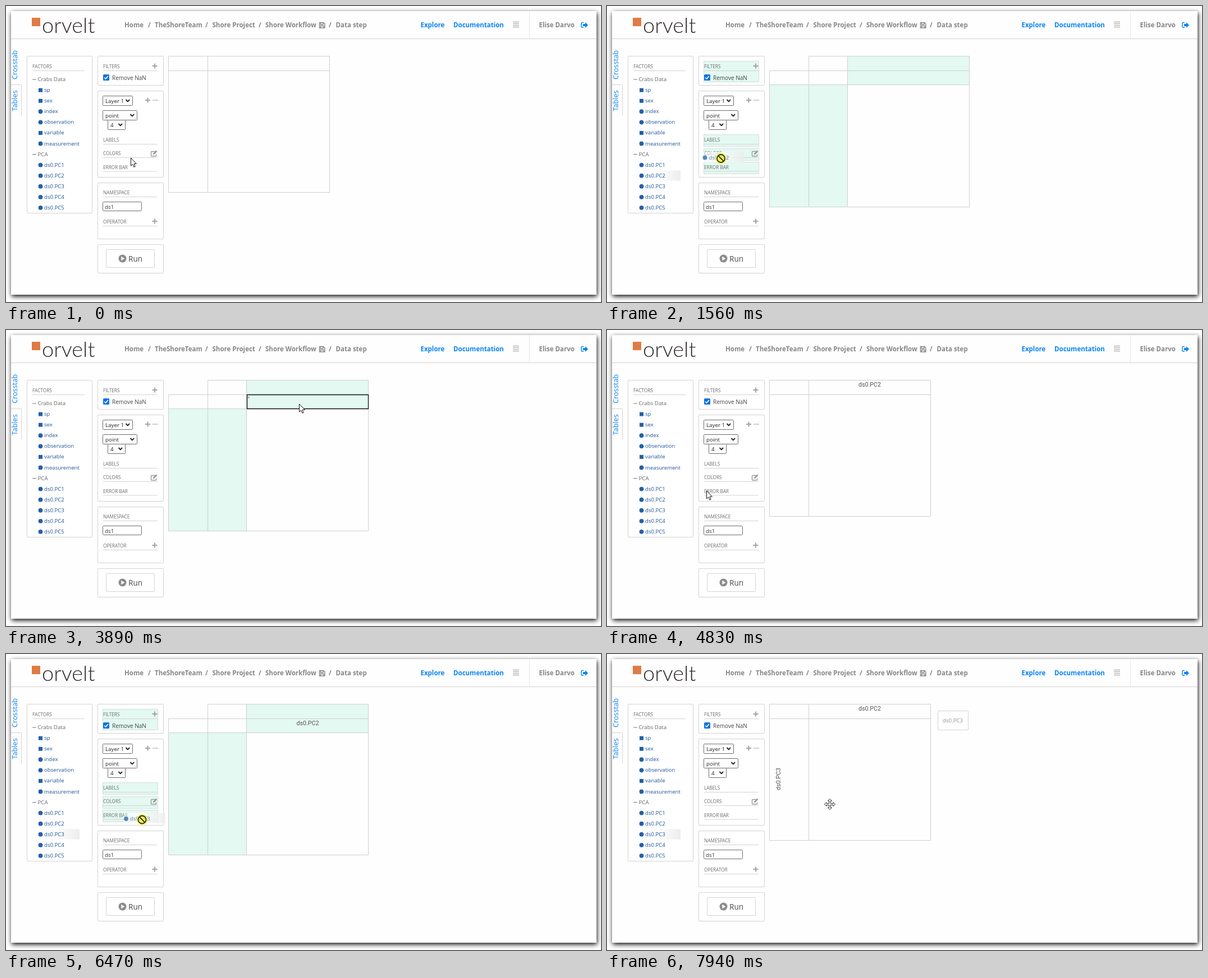
An HTML page for the animation above (8000 ms loop, 1060 px wide and 528 px high).

```html
<!DOCTYPE html>
<html lang="en">
<head>
<meta charset="utf-8">
<title>Data step</title>
<style>
html, body { margin: 0; width: 100%; height: 100%; overflow: hidden; background: #fff; }
svg { display: block; width: 1060px; height: 528px; }
text { font-family: "Open Sans", "Noto Sans", sans-serif; white-space: pre; }
.axis { font-family: Roboto, "Liberation Sans", sans-serif; }
.logo { font-family: Lato, "Open Sans", sans-serif; }
#win { filter: drop-shadow(1px 3px 4.2px rgba(0, 0, 0, .95)); }
</style>
</head>
<body>
<svg id="stage" viewBox="0 0 1060 528" xmlns="http://www.w3.org/2000/svg">
  <defs>
    <linearGradient id="shade">
      <stop offset=".3" stop-color="#f2f2f2" stop-opacity="0"/>
      <stop offset="1" stop-color="#ededed"/>
    </linearGradient>
    <linearGradient id="veil">
      <stop offset="0" stop-color="#fff" stop-opacity=".55"/>
      <stop offset=".3" stop-color="#fff"/>
      <stop offset="1" stop-color="#ececec"/>
    </linearGradient>
  </defs>
  <rect id="win" x="9" y="9" width="1043" height="506" fill="#fefefe"/>
  <g id="base"></g>
  <g id="marks"></g>
  <g id="panels"></g>
  <g id="grid"></g>
  <g id="pointer"></g>
</svg>
<script>
const LOOP = 8000;
const GREY = '#868686', LINE = '#d3d3d3', BLUE = '#0a84f5', ITEM = '#2460a8', LINK = '#1f5596', MINT = '#e3f9f1';
const $ = id => document.getElementById(id);

const text = (x, y, s, size = 9.7, fill = '#666', extra = '') =>
  `<text x="${x}" y="${y}" font-size="${size}" fill="${fill}" ${extra}>${s}</text>`;
const bold = (x, s, fill = GREY) => text(x, 38, s, 11.5, fill, 'font-weight="700"');
const path = (d, stroke = LINE, extra = '') => `<path d="${d}" fill="none" stroke="${stroke}" ${extra}/>`;
const fill = (x0, y0, x1, y1, color, extra = '') =>
  `<rect x="${x0}" y="${y0}" width="${x1 - x0}" height="${y1 - y0}" fill="${color}" ${extra}/>`;
const box = (x0, y0, x1, y1, stroke = LINE, r = 1.5) =>
  fill(x0 + .5, y0 + .5, x1 + .5, y1 + .5, '#fff', `stroke="${stroke}" rx="${r}"`);
const label = (x, y, s, end) =>
  text(x, y, s, 8.25, '#6c6c6c') + path(`M${x} ${y + 4.5}H${end}`);
const plus = (x, y) => path(`M${x - 4.5} ${y}h9M${x} ${y - 4.5}v9`, '#a3a3a3', 'stroke-width="2"');
const select = (x0, y0, x1, s) => box(x0, y0, x1, y0 + 17, '#6d6d6d', 1) +
  text(x0 + 5, y0 + 12.7, s, 9.8, '#222') +
  path(`M${x1 - 11.5} ${y0 + 7}l3.3 3.4l3.3 -3.4`, '#222', 'stroke-width="1.8"');

// Factor list
const GROUPS = { '-1': 'Crabs Data', 6: 'PCA' };
const NAMES = ['sp', 'sex', 'index', 'observation', 'variable', 'measurement', '',
  'ds0.PC1', 'ds0.PC2', 'ds0.PC3', 'ds0.PC4', 'ds0.PC5'];
const rowY = i => 149.6 + 19.07 * i;
const bullet = (x, y, square) => square
  ? fill(x - 3.5, y - 3, x + 3.5, y + 4, ITEM)
  : `<circle cx="${x}" cy="${y + .5}" r="3.9" fill="${ITEM}"/>`;
const factor = (i, square) => bullet(61.5, rowY(i), square) + text(68, rowY(i) + 3.6, NAMES[i], 9.6, LINK);

function factors() {
  let out = '';
  for (const i in GROUPS) {
    out += path(`M47 ${rowY(+i) + .5}h7`, '#777') + text(56.5, rowY(+i) + 3.6, GROUPS[i], 9.7, '#666');
  }
  NAMES.forEach((s, i) => {
    if (s) out += factor(i, [0, 1, 4].includes(i));
  });
  return out;
}

function header() {
  return fill(46, 21, 61, 36, '#df7b45') +
    text(64, 48, 'orvelt', 38, '#2e2826', 'class="logo" font-weight="300"') +
    bold(211, 'Home') + bold(253, '/') + bold(265, 'TheShoreTeam') + bold(355, '/') +
    bold(367.5, 'Shore Project') + bold(450, '/') + bold(462, 'Shore Workflow') +
    path('M558.5 29.5h7l2.5 2.5v7h-9.5zM560.5 30v3h4.5v-3M560.5 39v-3.5h5.5v3.5', GREY, 'stroke-width="1.4"') +
    bold(575, '/') + bold(587.5, 'Data step') +
    bold(738.5, 'Explore', BLUE) + bold(797, 'Documentation', BLUE) +
    path('M903 28.5h11M903 31.5h11M903 34.5h11M903 37.5h11', '#999') +
    bold(949.5, 'Elise Darvo') +
    path('M1029 29.5h-2.5q-1.5 0 -1.5 1.5v5.5q0 1.5 1.5 1.5h2.5', BLUE, 'stroke-width="1.5"') +
    `<path d="M1028 32h4v-3l5 5l-5 5v-3h-4z" fill="${BLUE}"/>` +
    path('M9 58.5H1052') + path('M932.5 9V58', '#e6e6e6');
}

function sidebar() {
  const tab = (y, s) => text(0, 0, s, 12.7, BLUE, `transform="translate(20 ${y}) rotate(-90)"`);
  return tab(131, 'Crosstab') + tab(187.5, 'Tables') + path('M9 140.5H27.5V195.5') +
    box(37, 89, 153, 369) + label(47, 111, 'FACTORS', 140) +
    box(163, 89, 280, 141) + box(163, 151, 280, 305) + box(163, 315, 280, 415) + box(163, 425, 280, 476);
}

function controls() {
  const pencil = path('M266 259.5h-6.5q-1 0 -1 1v6.5q0 1 1 1h7q1 0 1 -1v-2.5', '#999', 'stroke-width="1.4"') +
    path('M262.5 264.5l6 -6', '#999', 'stroke-width="2.6"');
  return label(173, 111, 'FILTERS', 270) + plus(265, 107) +
    fill(173, 122, 184, 133, '#0f74e0', 'rx="1.5"') +
    path('M175.3 127.7l2.3 2.4l4.2 -5', '#fff', 'stroke-width="1.6"') + text(189, 131.8, 'Remove NaN', 10, '#444') +
    select(172, 160, 225, 'Layer 1') + select(172, 186, 233, 'point') + select(181, 203, 212, '4') +
    plus(252.5, 168) + path('M261 168h10', '#cfcfcf', 'stroke-width="2"') +
    label(173, 242, 'LABELS', 270) + label(173, 266, 'COLORS', 270) + pencil +
    label(173, 290.5, 'ERROR BAR', 270) + label(173, 336, 'NAMESPACE', 270) +
    box(172, 349, 241, 365, '#6d6d6d', 2) + text(176, 361.5, 'ds1', 9.8, '#333') +
    label(173, 388, 'OPERATOR', 270) + plus(265, 384) +
    box(178, 434, 264, 466) + '<circle cx="207.5" cy="450.5" r="7" fill="#8c8c8c"/>' +
    '<path d="M205.3 446.8l6 3.7l-6 3.7z" fill="#fff"/>' + text(218, 456, 'Run', 13.6, '#4a4a4a');
}

const mintBox = (y0, y1) => fill(172.5, y0 + .5, 270.5, y1 + .5, MINT, 'stroke="#d2deda"');
const HIGHLIGHT = mintBox(98, 135) + mintBox(229, 250) + mintBox(254, 275) + mintBox(278, 299);

// Crosstab
const axisName = (x, y, s) => text(x, y, s, 10.7, '#555', 'class="axis" text-anchor="middle"');
const ZONES = [[429, 115, 646, 141], [429, 89, 646, 115], [290, 141, 359, 358], [359, 141, 429, 358]];
const inside = (p, [x0, y0, x1, y1]) => p.x >= x0 && p.x < x1 && p.y >= y0 && p.y < y1;

function crosstab(t, p, wide, dragging) {
  const named = t >= 4050;
  if (!wide) {
    let out = path('M289.5 89.5H576.5V332.5H289.5zM359.5 89.5V332.5M289.5 115.5H576.5', '#cfcfcf');
    if (named) out += axisName(468, 101, 'ds0.PC2');
    if (t >= 7940) {
      out += `<g transform="translate(309 223) rotate(-90)">${axisName(0, 0, 'ds0.PC3')}</g>` +
        box(589, 101, 643, 135) + text(598, 122.3, 'ds0.PC3', 9.7, '#8f8f8f');
    }
    return out;
  }
  let out = fill(429, 89, 646, 141, MINT) + fill(290, 141, 429, 358, MINT) +
    path('M359.5 89.5H645.5V358.5H289.5V115.5H645.5M359.5 89.5V358.5M428.5 89.5V358.5M289.5 140.5H645.5', '#cfcfcf');
  if (named) out += axisName(537.5, 127, 'ds0.PC2');
  const zone = ZONES.find(z => inside(p, z));
  if (zone) {
    const [x0, y0, x1, y1] = zone;
    out += path(`M${x0 + .5} ${y0 + .5}H${x1 - .5}V${y1 - .5}H${x0 + .5}z`, '#111', 'stroke-width="1.3"');
    if (!dragging && !named) out += path('M430.5 118.5l3.5 3.5m0 -3.5l-3.5 3.5', '#666', 'stroke-width=".8"');
  }
  return out;
}

// Cursor route: time, x, y, number of equal jumps since the previous key, eased
const ROUTE = [
  [0, 222, 271, 1], [780, 89, 303, 10, 1], [1470, 106, 300, 1], [1555, 203, 272, 1],
  [2180, 510, 150, 8], [2340, 520, 139, 2], [2640, 524, 135, 4], [2800, 522, 132, 1],
  [4050, 522, 129, 1], [4130, 522, 129, 1], [4990, 100, 322, 11, 1], [5220, 97, 327, 3],
  [5530, 89, 320, 4], [6070, 95, 322, 1], [6840, 390, 269, 10, 1], [7080, 397, 268, 3]
];

function cursorAt(t) {
  const i = ROUTE.findIndex(k => k[0] > t);
  if (i < 0) return { x: 397, y: 268 };
  const [t0, x0, y0] = ROUTE[i - 1], [t1, x1, y1, n, eased] = ROUTE[i];
  let u = Math.floor((t - t0) / (t1 - t0) * n + .001) / n;
  if (eased) u = u * u * (3 - 2 * u);
  else if (n > 4) u = 1 - Math.pow(1 - u, 1.5);
  return { x: x0 + (x1 - x0) * u, y: y0 + (y1 - y0) * u };
}

const ARROW = '<path d="M.5 0V14.2L3.7 11.2L5.8 16.3L8.1 15.3L6 10.4H10.3Z" fill="#fff" stroke="#111"/>';
const DROP = ARROW + '<rect x="3" y="14.5" width="9" height="6.5" rx="1" fill="#fff" stroke="#222" stroke-width="1.3" stroke-dasharray="2 .6"/>';
const DENY = path('M-5 -5L5 5', '#33330c', 'stroke-width="1.8"') +
  '<circle r="7" fill="none" stroke="#33330c" stroke-width="1.8"/>';
const MOVE = '<path d="M0 -9.5L3.5 -6H1.3V-1.3H6V-3.5L9.5 0L6 3.5V1.3H1.3V6H3.5L0 9.5' +
  'L-3.5 6H-1.3V1.3H-6V3.5L-9.5 0L-6 -3.5V-1.3H-1.3V-6H-3.5Z" fill="#fff" stroke="#222"/>';

function ghost(name) {
  return '<g opacity=".72">' + fill(-33, -12, 41, 7, 'url(#veil)') +
    bullet(-28.5, -2, false) + text(-21.5, 1.8, name, 9.6, LINK) + '</g>';
}

const between = (t, a, b) => t >= a && t < b;

function draw(t) {
  const p = cursorAt(t);
  const second = t >= 5770;
  const dragging = between(t, 1470, 3890) || between(t, 6070, 7780);
  const pressed = between(t, 1150, 3890) || between(t, 5770, 7780);
  const wide = between(t, 1550, 4050) || between(t, 6145, 7940);

  let hovered = -1;
  if (dragging) hovered = second ? 9 : 8;
  else if (t >= 7940) hovered = 9;
  else if (p.x > 57 && p.x < 131) hovered = Math.round((p.y - 149.6) / 19.07);
  $('marks').innerHTML = (hovered >= 0
    ? fill(57, rowY(hovered) - 9, 131, rowY(hovered) + 9.5, 'url(#shade)') : '') + factors();

  $('panels').innerHTML = (dragging ? HIGHLIGHT : '') + controls();
  $('grid').innerHTML = crosstab(t, p, wide, dragging);

  let icon = ARROW;
  if (dragging) {
    const allowed = wide ? ZONES.some(z => inside(p, z)) : second;
    icon = allowed ? DROP : DENY;
  } else if (hovered >= 0 || (!wide && inside(p, [359, 115, 576, 332]))) icon = MOVE;

  $('pointer').innerHTML = `<g transform="translate(${p.x.toFixed(1)} ${p.y.toFixed(1)})">` +
    (dragging ? ghost(second ? 'ds0.PC3' : 'ds0.PC2') : '') +
    (pressed ? '<circle r="10" fill="#f6ee3a" opacity=".7"/>' : '') + icon + '</g>';
}

$('base').innerHTML = header() + sidebar();

const start = performance.now();
function tick() {
  draw((performance.now() - start) % LOOP);
  requestAnimationFrame(tick);
}
draw(0);
requestAnimationFrame(tick);
</script>
</body>
</html>
```
